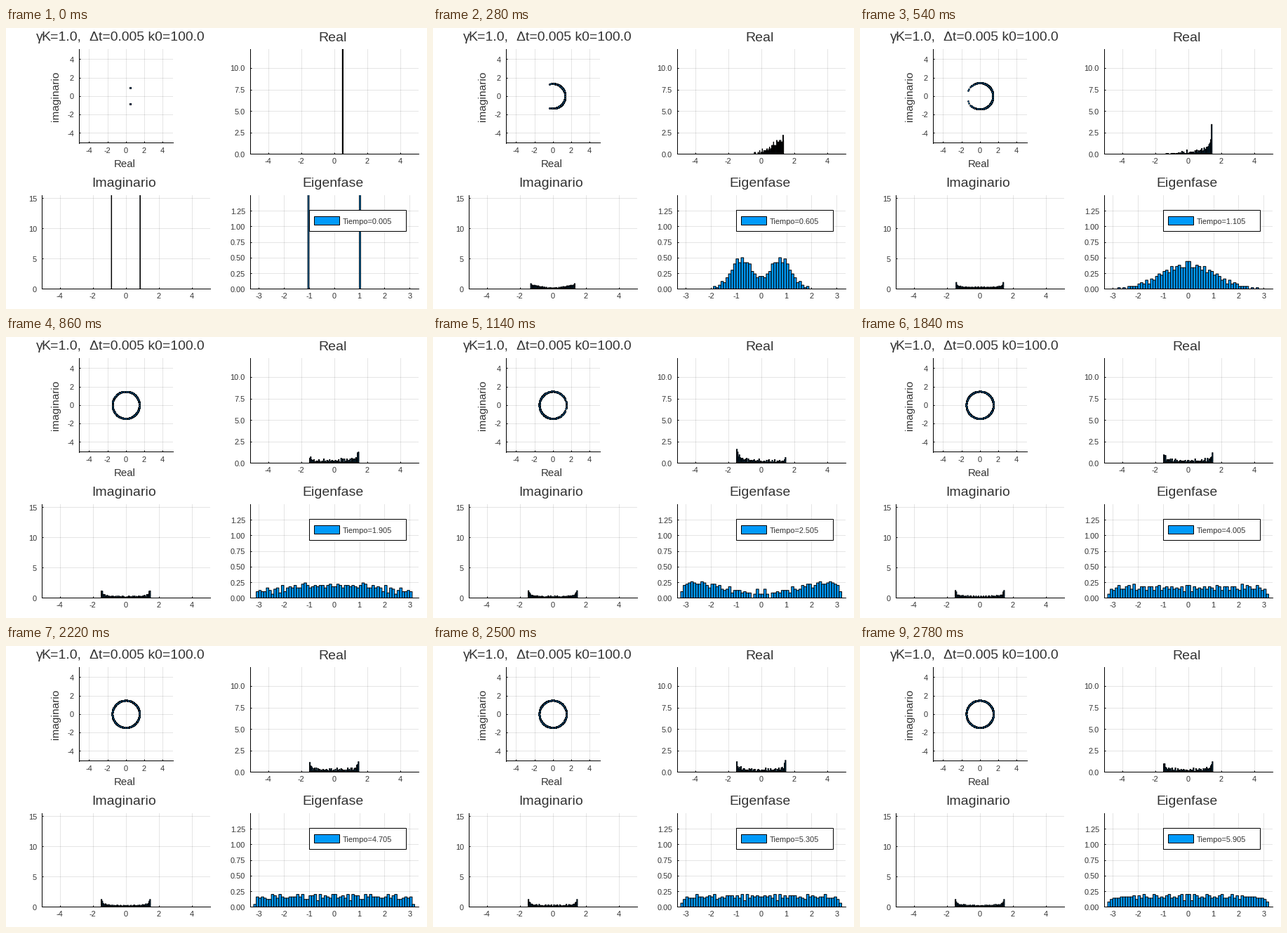
Animation of 600 by 400 pixels, one loop 2.88 s. Source, as a matplotlib script:

```python
import numpy as np
import matplotlib
import matplotlib.pyplot as plt
from matplotlib.animation import FuncAnimation
from matplotlib.collections import PolyCollection
from matplotlib.patches import Rectangle

matplotlib.rcParams["font.family"] = "Liberation Sans"

W, H, DPI = 600, 400, 100
PX = 72 / DPI
BLUE, INK = "#009afa", "#333333"
PAIRS, STEPS, TICK = 250, 60, 20

fig = plt.figure(figsize=(W / DPI, H / DPI), dpi=DPI, facecolor="white")


def label(x, y, text, size, ha="center", **kw):
    return fig.text(x / W, 1 - y / H, text, fontsize=size * PX, color=INK,
                    ha=ha, va="baseline", **kw)


def panel(box, xlim, ylim, xticks, yticks, fmt):
    """Axes from a pixel box (left, top, right, bottom) with hand-placed labels."""
    left, top, right, bottom = box
    ax = fig.add_axes([left / W, 1 - bottom / H,
                       (right - left) / W, (bottom - top) / H])
    ax.set(xlim=xlim, ylim=ylim, xticks=xticks, yticks=yticks)
    ax.tick_params(direction="in", length=2.5 * PX, width=PX,
                   labelbottom=False, labelleft=False)
    ax.grid(color="black", alpha=0.1, linewidth=PX)
    ax.set_axisbelow(True)
    for side in ("top", "right"):
        ax.spines[side].set_visible(False)
    for side in ("left", "bottom"):
        ax.spines[side].set_linewidth(PX)
    for v in xticks:
        x = left + (v - xlim[0]) / (xlim[1] - xlim[0]) * (right - left)
        label(x, bottom + 14, f"{v}", 11)
    for v in yticks:
        y = bottom - (v - ylim[0]) / (ylim[1] - ylim[0]) * (bottom - top)
        label(left - 7, y + 4.4, fmt.format(v), 11, "right")
    return ax


def bars(ax):
    coll = PolyCollection([], facecolors=BLUE, edgecolors="black",
                          linewidths=PX, zorder=2, snap=False)
    ax.add_collection(coll, autolim=False)
    return coll


even = [-4, -2, 0, 2, 4]
wide = (-5.1, 5.1)
plane = panel((104, 30, 237.5, 163.5), wide, wide, even, even, "{}")
real_ax = panel((348, 30, 587.5, 179.4), wide, (0, 12.2), even,
                [0, 2.5, 5, 7.5, 10], "{:.1f}")
imag_ax = panel((51, 238, 290.5, 371.4), wide, (0, 15.5), even,
                [0, 5, 10, 15], "{}")
phase_ax = panel((348, 238, 587.5, 371.4), (-3.34, 3.34), (0, 1.5),
                 list(range(-3, 4)), [0, 0.25, 0.5, 0.75, 1, 1.25], "{:.2f}")

label(42.5, 18, "γ", 19.5, "left")
label(50, 18, "K=1.0,", 19.5, "left")
label(119, 18, "Δt=0.005 k0=100.0", 19.4, "left")
label(465.5, 19, "Real", 19.5)
label(168.5, 226, "Imaginario", 19.5)
label(466, 226, "Eigenfase", 19.5)
label(169.5, 197.5, "Real", 15)
label(75, 97.5, "imaginario", 15.4, rotation=90, rotation_mode="anchor")


def box(x0, y0, x1, y1, color):
    fig.add_artist(Rectangle((x0 / W, 1 - y1 / H), (x1 - x0) / W, (y1 - y0) / H,
                             facecolor=color, edgecolor="black", linewidth=PX))


box(432.2, 258.8, 569.8, 288.8, "white")
box(438.8, 267.8, 474.8, 279.8, BLUE)
clock = label(480, 279, "", 11, "left")
clock.set_zorder(5)

dots = plane.scatter([], [], s=(1.9 * PX) ** 2, facecolors=BLUE,
                     edgecolors="black", linewidths=0.8 * PX, zorder=3,
                     snap=False)
real_bars, imag_bars, phase_bars = map(bars, (real_ax, imag_ax, phase_ax))

FINE = 40
bell = np.random.default_rng(3).normal(size=PAIRS * FINE)
grid = np.linspace(0, np.pi, 500)
order = np.random.default_rng(5).permutation(2 * PAIRS)


def phases(k):
    """Upper half of the phases: two clusters that spread over the circle."""
    t = 0.1 * k
    mean = max(0, np.pi / 3 - 0.002 - 0.45 * t)
    spread = min(2.6, 0.001 + 0.6 * t + 0.14 * t * t)
    x = np.mod(mean + spread * bell, 2 * np.pi)
    x = np.sort(np.minimum(x, 2 * np.pi - x))

    # nearly even ranks keep neighbours apart
    jitter = 2 * np.random.default_rng(100 + k).normal(size=PAIRS)
    rank = np.abs(np.arange(PAIRS) + 0.5 + jitter)
    rank = PAIRS - 0.1 - np.abs(PAIRS - 0.1 - rank)
    x = x[(rank * FINE).astype(int)]

    # passing dip around phase zero
    dip = -0.37 * np.exp(-((t - 2.8) / 0.75) ** 2)
    return np.interp(x, grid + 2 * dip * np.sin(grid), grid)


def nice_step(width):
    base = 10.0 ** np.floor(np.log10(width))
    r = width / base
    return base * (1 if r <= 1.1 else 2 if r <= 2.2 else 5 if r <= 5.5 else 10)


def hist_polys(data, bins):
    step = nice_step(np.ptp(data) / bins)
    lo = np.floor(data.min() / step)
    hi = np.floor(data.max() / step) + 1
    edges = np.arange(lo, hi + 0.5) * step
    heights, _ = np.histogram(data, edges, density=True)
    return [[(a, 0), (a, h), (b, h), (b, 0)]
            for a, b, h in zip(edges[:-1], edges[1:], heights) if h > 0]


def make_state(k):
    up = phases(k)
    theta = np.concatenate([up, -up])[order]
    radius = 1.478 - 0.478 * np.exp(-0.1 * k / 0.47)
    x, y = radius * np.cos(theta), radius * np.sin(theta)
    return (np.column_stack([x, y]), hist_polys(x, 100), hist_polys(y, 100),
            hist_polys(theta, 60), f"Tiempo={0.005 + 0.1 * k:.3f}")


states = [make_state(k) for k in range(STEPS)]

# every third step, and the last one, is held five ticks
schedule = [k for k in range(STEPS)
            for _ in range(5 if k % 3 == 1 or k == STEPS - 1 else 1)]


def update(i):
    points, re, im, ph, text = states[schedule[i]]
    dots.set_offsets(points)
    real_bars.set_verts(re)
    imag_bars.set_verts(im)
    phase_bars.set_verts(ph)
    clock.set_text(text)
    return dots, real_bars, imag_bars, phase_bars, clock


anim = FuncAnimation(fig, update, frames=len(schedule), interval=TICK,
                     init_func=lambda: update(0), repeat=True, repeat_delay=0)
plt.show()
```
